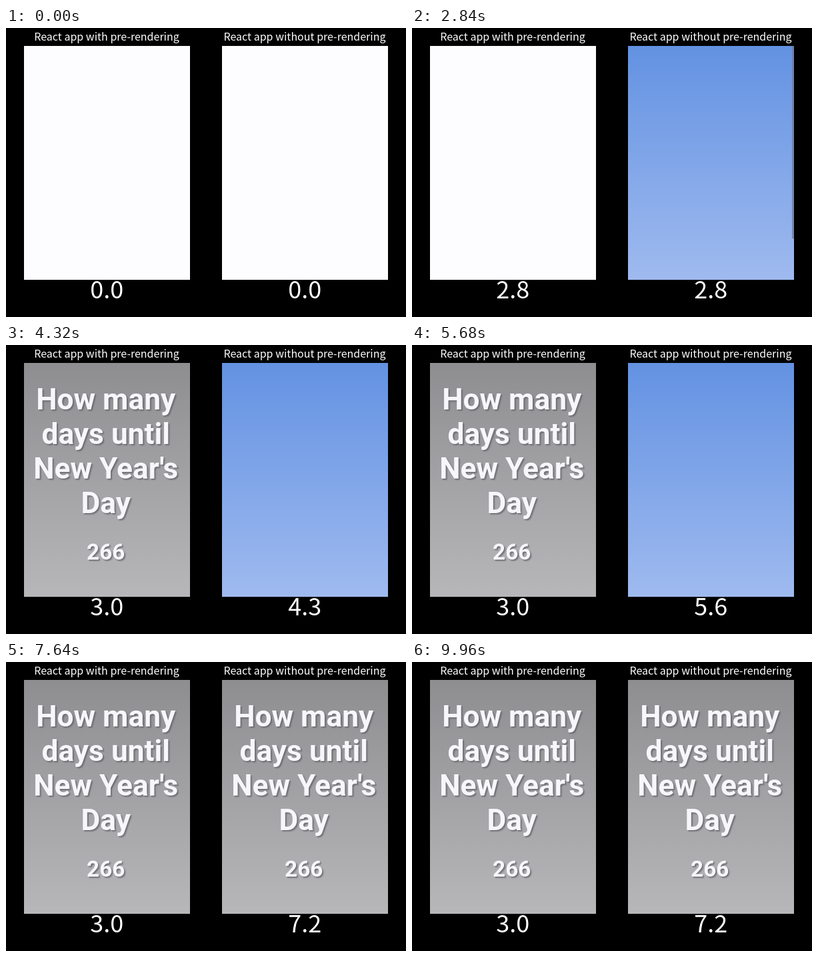
An HTML page with a canvas for the animation above (10000 ms loop, 600 px wide and 435 px high).

```html
<!DOCTYPE html>
<html lang="en">
<head>
<meta charset="utf-8">
<title>Pre-rendering comparison</title>
<style>
html, body { margin: 0; width: 100%; height: 100%; overflow: hidden; background: #000; }
canvas { display: block; }
</style>
</head>
<body>
<canvas id="stage" width="600" height="435"></canvas>
<script>
const ctx = document.getElementById('stage').getContext('2d');
const LOOP = 10000;
const TOP = 27, WIDTH = 249, HEIGHT = 352;
const CAPTION_FONT = '"Noto Sans CJK JP", "Noto Sans CJK SC", "Noto Sans CJK", "Noto Sans", sans-serif';
const PAGE_FONT = 'Roboto, sans-serif';
const HEADING = ['How many', 'days until', "New Year's", 'Day'];

const panels = [
  { x: 27, title: 'React app with pre-rendering', ready: 3000 },
  { x: 324, title: 'React app without pre-rendering', styled: 2600, ready: 7200 }
];

function text(str, x, y, font, color = '#fff') {
  ctx.font = font;
  ctx.fillStyle = color;
  ctx.fillText(str, x, y);
}

function fillPanel(x, from, to = from) {
  const shade = ctx.createLinearGradient(0, TOP, 0, TOP + HEIGHT);
  shade.addColorStop(0, from);
  shade.addColorStop(1, to);
  ctx.fillStyle = shade;
  ctx.fillRect(x, TOP, WIDTH, HEIGHT);
}

function drawPage(x) {
  const center = x + 122.7;
  fillPanel(x, '#8e8d90', '#b7b6b9');
  ctx.save();
  ctx.shadowColor = 'rgba(95, 94, 98, 0.75)';
  ctx.shadowOffsetX = ctx.shadowOffsetY = 2;
  ctx.shadowBlur = 2;
  HEADING.forEach((line, i) =>
    text(line, center, 97 + i * 52, `700 44.3px ${PAGE_FONT}`, '#f7f6fa'));
  text('266', center, 323, `700 33.3px ${PAGE_FONT}`, '#f7f6fa');
  ctx.restore();
}

function drawScrollbar(x, age) {
  const alpha = Math.max(0, Math.min(1, (550 - age) / 250));
  ctx.fillStyle = `rgba(110, 125, 155, ${0.8 * alpha})`;
  ctx.fillRect(x + WIDTH - 3, TOP, 3, 290);
}

function drawPanel({ x, title, styled, ready }, time) {
  if (time >= ready) {
    drawPage(x);
  } else if (time >= styled) {
    fillPanel(x, '#6392e2', '#9fbaef');
    drawScrollbar(x, time - styled);
  } else {
    fillPanel(x, '#fdfcff');
  }
  const tenths = Math.floor(Math.min(time, ready) / 100);
  text(title, x + 124, 18.5, `500 16px ${CAPTION_FONT}`);
  text((tenths / 10).toFixed(1), x + 124.3, 407, `500 36px ${CAPTION_FONT}`);
}

let start;
function frame(now) {
  start ??= now;
  const time = (now - start) % LOOP;
  ctx.fillStyle = '#000';
  ctx.fillRect(0, 0, 600, 435);
  ctx.textAlign = 'center';
  panels.forEach(panel => drawPanel(panel, time));
  requestAnimationFrame(frame);
}
requestAnimationFrame(frame);
</script>
</body>
</html>
```
